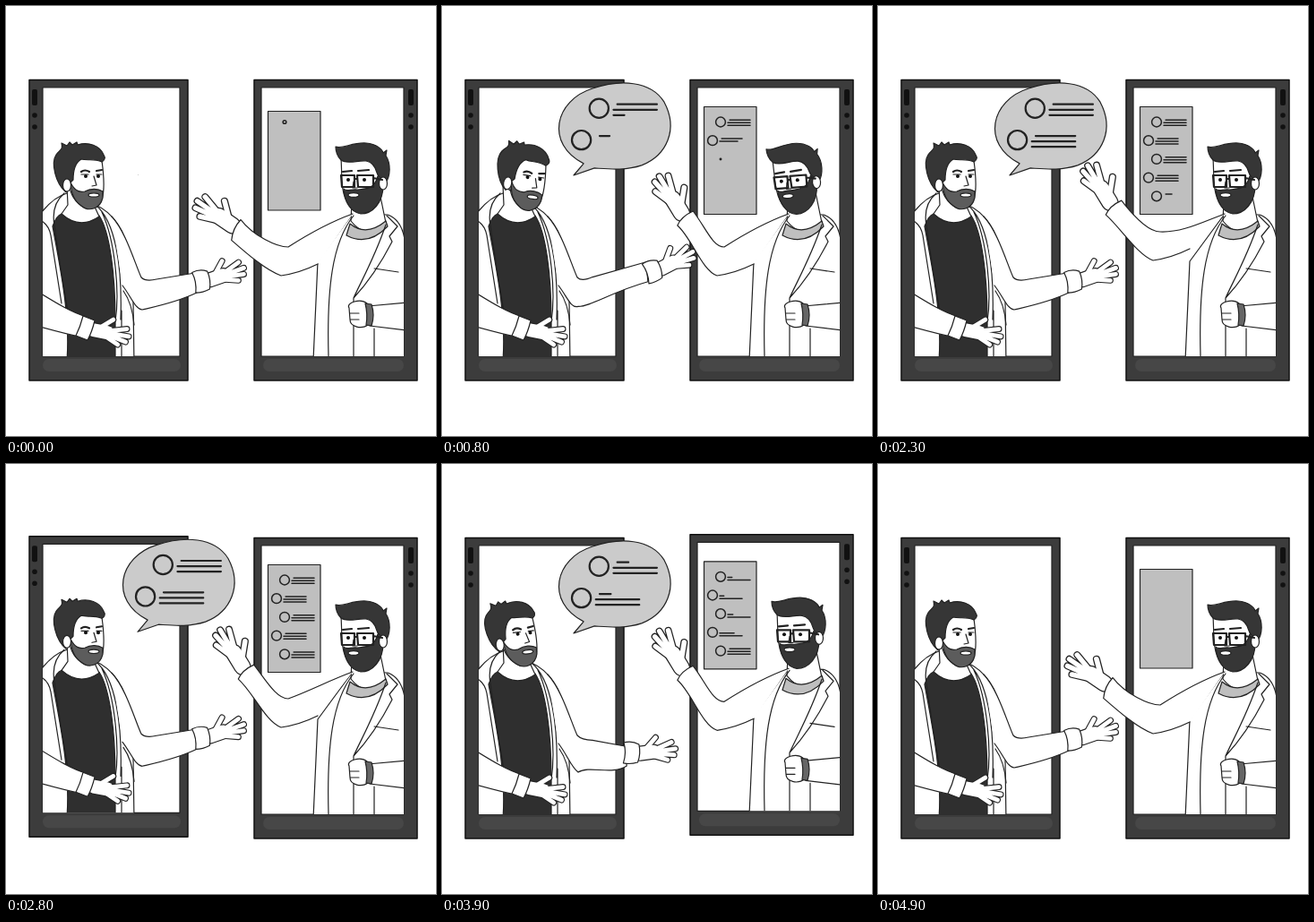
An HTML page for the animation above (5 s loop, 480 by 480 pixels).

```html
<!DOCTYPE html>
<html>
<head>
<meta charset="utf-8">
<style>
html, body { margin: 0; width: 100%; height: 100%; overflow: hidden; background: #fff }
svg { display: block; width: 100vw; height: 100vh; stroke: #222; stroke-width: 1.2; stroke-linejoin: round; stroke-linecap: round; fill: none }
.w { fill: #fff }
.d { fill: #363636 }
.g { fill: #bfbfbf }
.k { fill: #111; stroke: none }
.frame { fill: #3c3c3c; stroke: #111; stroke-width: 1.5 }
.b { stroke-width: 2.2 }
.p { stroke-width: 1.5 }
</style>
</head>
<body>
<svg viewBox="0 0 480 480">
<defs>
  <clipPath id="cl"><rect x="41" y="60" width="153" height="331"/></clipPath>
  <clipPath id="cr"><rect x="285" y="60" width="159" height="331"/></clipPath>
  <path id="palm" d="M2 0L17-3"/>
  <path id="fingers" d="M9-7L18-19M21-7L36-15M22-4L41-8M22-1L40-1M19 2L33 5"/>
  <g id="hand">
    <use href="#palm" stroke-width="17.2"/><use href="#fingers" stroke-width="7"/>
    <g stroke="#fff"><use href="#palm" stroke-width="15"/><use href="#fingers" stroke-width="4.8"/></g>
  </g>
  <g id="camera" class="k">
    <rect x="-3" y="93" width="6" height="18" rx="2"/><circle cy="122" r="2.8"/><circle cy="135" r="2.8"/>
  </g>
</defs>
<g id="right">
  <rect class="frame" x="277" y="82.5" width="182" height="335.5"/>
  <rect class="w" x="285" y="91" width="159" height="300"/>
  <path stroke="#474747" stroke-width="14" d="M294 401H437"/>
  <use href="#camera" x="452"/>
  <rect id="panel" class="g" x="292.5" width="58.5"/>
  <g id="list"></g>
  <g clip-path="url(#cr)">
    <path class="w" d="M387 232L426 233C440 238 446 252 446 275V396H343L348 285Z"/>
    <path class="w" d="M386 218L385 240Q402 262 424 242L417 208Z"/>
    <path class="g" d="M384 243Q402 258 424 240L426 246Q404 269 380 256Z"/>
    <path d="M388 234C364 264 358 315 360 391M425 234L437 246 428 257 431 263Q412 300 388 326M424 244C412 280 396 308 388 326V391M411 360V391M411 293L438 297"/>
    <path class="w" d="M404 335L448 331V362L406 357Z"/>
    <path class="w" d="M383 337C379 331 396 326 403 332L405 355C397 362 384 358 384 350ZM384 343H394M384 350H394"/>
    <path fill="#666" d="M401 332L408 333Q412 345 408 357L402 356Q404 344 401 332Z"/>
    <g id="headR">
      <path class="w" d="M374 168H412L419 195C420 215 410 229 396 230 382 228 376 215 375 195Z"/>
      <path class="d" d="M377 204C380 208 385 204 392 205 402 204 411 205 415 190L421 200C421 220 409 232 396 232 384 230 378 218 377 204Z"/>
      <path class="d" d="M368 157C376 160 386 152 402 153 414 154 420 160 421 164L425 161 424 167C430 176 429 190 424 197 418 193 415 190 414 186 412 179 408 174 402 173 393 172 381 177 374 172 370 168 368 163 368 157Z"/>
      <ellipse class="w" cx="421" cy="198" rx="4.5" ry="7"/>
      <path class="b" d="M376 185L386 184M393 184L405 183"/>
      <path class="b" d="M374 189H389V202H375ZM392 189H410V202H393ZM389 193H392M410 192L420 194"/>
      <path d="M388 196L387 203 392 203"/>
      <circle class="k" cx="382" cy="194" r="2"/><circle class="k" cx="400" cy="194" r="2"/>
      <ellipse class="w" cx="388" cy="211" rx="6" ry="2.4"/>
    </g>
  </g>
  <g id="handR"><use href="#hand" transform="scale(-1.2 1.12)"/></g>
  <path id="sleeveR" class="w"/>
</g>
<g id="left">
  <rect class="frame" x="26" y="82.5" width="177" height="335.5"/>
  <rect class="w" x="41" y="91" width="153" height="300"/>
  <path stroke="#474747" stroke-width="14" d="M48 401H188"/>
  <use href="#camera" x="32"/>
  <g clip-path="url(#cl)">
    <path class="w" d="M40 230C48 220 58 212 68 209L100 222C118 230 134 250 138 280L142 330 143 400H36Z"/>
    <path fill="#2f2f2f" d="M62 232Q83 248 104 234C116 252 122 300 122 352V395H68C72 345 60 290 52 246Q56 234 62 232Z"/>
    <path class="w" d="M68 200L69 222 62 232Q82 250 104 235L98 222Z"/>
    <path d="M65 209Q50 222 54 245C60 290 66 320 69 342M40 240Q48 245 50 256L62 332M100 222C122 240 130 290 128 350M107 230C122 262 127 320 122 352M131 318Q141 332 143 356M129 340V391"/>
    <g id="headL">
      <path class="w" d="M71 166H106C109 185 110 202 108 212 104 226 92 229 84 223 74 216 70 205 70 192Z"/>
      <path fill="#5c5c5c" d="M72 197C77 207 82 208 88 207 95 203 103 204 108 207V214C105 227 92 230 84 223 76 217 73 210 72 197Z"/>
      <path class="d" d="M67 208C55 198 50 175 56 166 60 160 64 161 62 153L68 156 71 152 74 155 79 152 80 155C92 151 105 156 109 166 112 170 109 173 107 174 98 170 91 173 84 171 77 175 75 184 75 194L72 197Z"/>
      <ellipse class="w" cx="68" cy="200" rx="4.5" ry="7"/>
      <path class="b" d="M84 185Q88 182 93 185M101 184L107 183"/>
      <path d="M98 190L101 200 96 201M84 188H92M101 188H107"/>
      <circle class="k" cx="89" cy="190" r="2"/><circle class="k" cx="103" cy="190" r="2"/>
      <ellipse class="w" cx="98" cy="211" rx="6" ry="2.2"/>
    </g>
    <g id="lowL">
      <use href="#hand" transform="translate(96 361) rotate(22)"/>
      <path class="w" d="M34 318C52 329 72 342 90 347L82 369C66 366 52 362 34 357Z"/>
      <path class="w" d="M86 346L99 351Q96 364 91 373L78 368Q83 358 86 346Z"/>
    </g>
  </g>
  <g id="bubble">
    <path fill="#cbcbcb" d="M158 176C115 154 126 106 168 93 198 83 232 84 247 108 263 138 250 167 222 178 204 184 186 182 170 181L147 189Z"/>
    <g id="notes"></g>
  </g>
  <path id="sleeveL" class="w"/>
  <g id="handL"><use href="#hand"/><path class="w" d="M-17-11Q-8-14 0-10 3 0 0 10-8 13-16 12Q-13 0-17-11Z"/></g>
</g>
</svg>
<script>
const $ = id => document.getElementById(id);
const set = (id, o) => { for (const k in o) $(id).setAttribute(k, o[k]); };
const clamp = x => Math.max(0, Math.min(1, x));
const ease = x => (1 - Math.cos(Math.PI * clamp(x))) / 2;
const ramp = (t, a, b) => ease((t - a) / (b - a));
// rises from a to b, falls from c to d
const pulse = (t, a, b, c, d) => ramp(t, a, b) - ramp(t, c, d);
const hop = (t, a, b) => 18 * pulse(t, a, (a + b) / 2, (a + b) / 2, b);
const move = (x, y, r = 0) => `translate(${x} ${y}) rotate(${r})`;
const grow = (x, y, s) => `translate(${x} ${y}) scale(${s}) translate(${-x} ${-y})`;

const note = i => ({ x: 175 - 19.5 * i, y: 115 + 35 * i, write: 500 + 260 * i, erase: 3785, r: 10.5, from: 16, to: 64, gap: 6 });
const item = i => ({ x: 311 - i % 2 * 9, y: 129.5 + 20.7 * i, write: 140 + 400 * i + 2 * i ** 4, erase: 3640 + 0.1 * i ** 6, r: 5.4, from: 8, to: 33, gap: 3 });

function row(t, { x, y, write, erase, r, from, to, gap }) {
  const size = r * pulse(t, write - 220, write - 20, 4250, 4550);
  let out = size > 0.2 ? `<circle cx="${x}" cy="${y}" r="${size}"/>` : '';
  for (let k = 0; k < 3; k++) {
    const wait = k * 130, indent = from + (k ? 0 : gap * 0.7);
    const p = clamp((t - write - wait) / 160) * (1 - clamp((t - erase - wait) / 160));
    if (p > 0) out += `<path d="M${x + indent} ${y + (k - 1) * gap + gap / 4}h${(to - indent) * p}"/>`;
  }
  return out;
}
function rows(t, n, make, style) {
  let out = '';
  for (let i = 0; i < n; i++) out += row(t, make(i));
  return `<g class="${style}">${out}</g>`;
}

function leftMan(t) {
  const lean = pulse(t, 0, 700, 1700, 2300), back = pulse(t, 3400, 3900, 4000, 4800);
  set('headL', { transform: `rotate(${9 * lean - 6 * back} 85 232)` });
  set('lowL', { transform: `rotate(${5 * pulse(t, 900, 1600, 1600, 2300)} 41 340)` });

  const lift = pulse(t, 0, 1400, 1700, 2300) - 0.85 * back;
  const x = 226 + 8 * lift + 12 * pulse(t, 0, 800, 800, 1600), y = 306 - 20 * lift;
  set('handL', { transform: move(x, y, -8 - 14 * lift) });
  set('sleeveL', { d: `M118 235C134 252 144 288 151 303Q156 308 168 ${305 - 4 * lift}L${x - 15} ${y - 8}L${x - 13} ${y + 14}C190 ${y + 25} 165 336 152 ${339 - 6 * lift}C144 338 140 325 130 312` });
}

function rightMan(t) {
  set('headR', { transform: `rotate(${-9 * pulse(t, 0, 1600, 1700, 2300)} 402 235)` });

  const wave = pulse(t, 0, 800, 800, 1600) + pulse(t, 1600, 2300, 4000, 4900);
  const raise = 17 * pulse(t, 1600, 2300, 2300, 3200);
  const x = 256 + 14 * wave - raise / 2, y = 250 - 13 * wave - raise * 0.7, e = 285 - raise;
  const turn = 28 + 24 * wave, a = turn * Math.PI / 180;
  const s = 13 * Math.sin(a), c = 13 * Math.cos(a);
  const ux = x + s, uy = y - c, dx = x - s * 0.7, dy = y + c;
  set('handR', { transform: move(x - 1, y - 4, turn - 4) });
  set('sleeveR', { d: `M387 232C362 241 340 253 315 ${e - 16}C302 ${e - 16} ${ux + 14} ${uy + 18} ${ux} ${uy}Q${x - 3} ${y - 2} ${dx} ${dy}C${dx + 16} ${dy + 14} 290 ${e + 10} 307 ${e + 16}Q328 ${e + 13} 348 ${e + 3}` });
}

function draw(t) {
  set('left', { transform: move(0, -hop(t, 50, 800) - hop(t, 2700, 3700)) });
  set('right', { transform: move(0, -hop(t, 1200, 2200) - hop(t, 3750, 4750)) });
  leftMan(t);
  rightMan(t);

  const size = 0.01 + pulse(t, 50, 450, 4350, 4750);
  set('bubble', { transform: grow(147, 189, size), visibility: t < 4750 ? 'visible' : 'hidden' });
  $('notes').innerHTML = rows(t, 2, note, 'b');

  const open = pulse(t, 0, 500, 4300, 4850);
  set('panel', { y: 117.5 - 5 * open, height: 110.5 + 9.5 * open });
  $('list').innerHTML = rows(t, 5, item, 'p');
}

const begin = performance.now();
function tick() {
  draw(Math.floor((performance.now() - begin) % 5000 / 100) * 100);
  requestAnimationFrame(tick);
}
tick();
</script>
</body>
</html>
```
